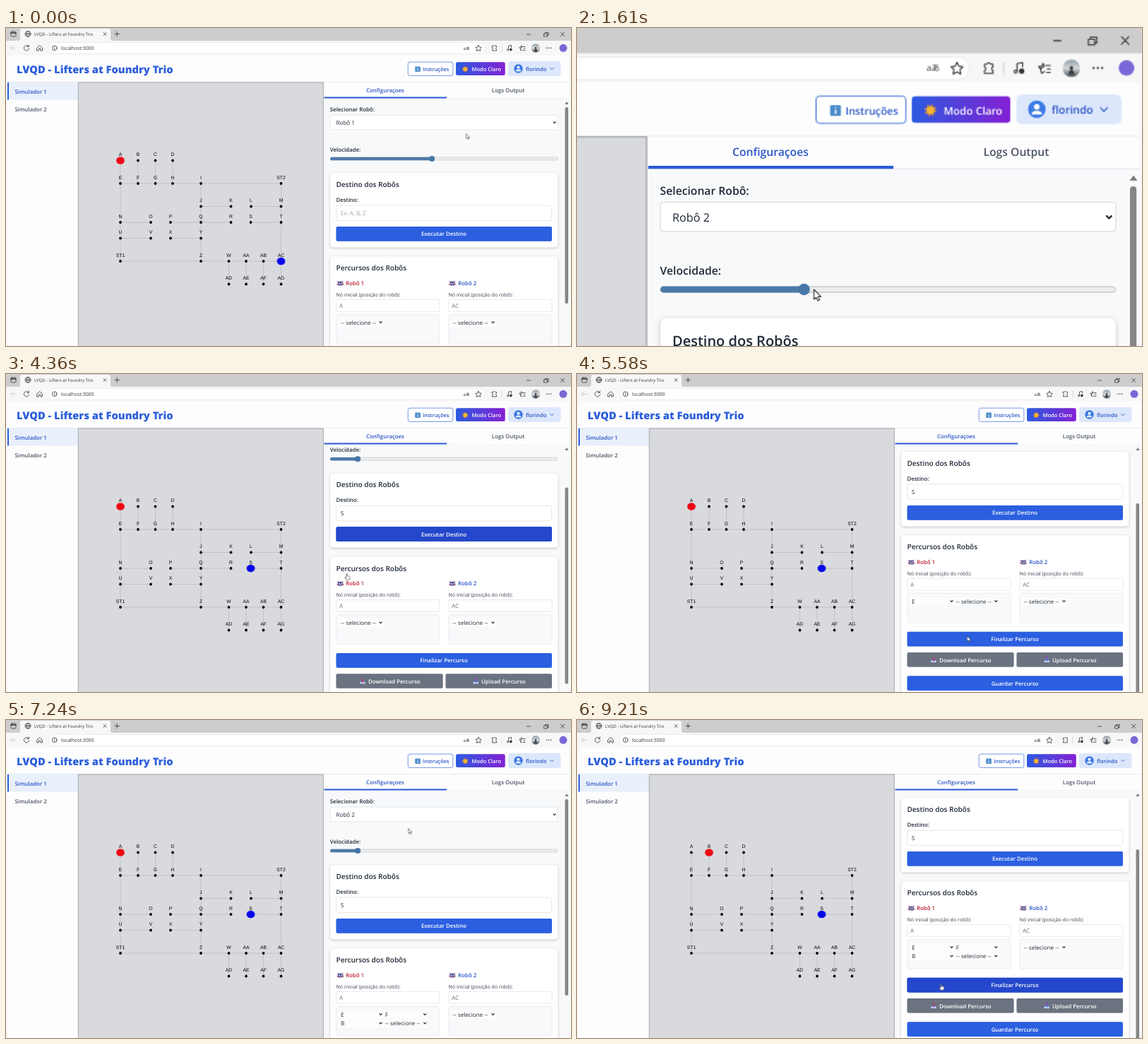
Animation, 800 px wide and 450 px high, one loop 9.24 s. Source, as an HTML page:

```html
<!DOCTYPE html>
<html lang="pt">
<head>
<meta charset="utf-8">
<title>Simulador</title>
<style>
html, body { margin: 0; width: 100%; height: 100%; overflow: hidden; background: #f7f7f7; }
svg { display: block; width: 100vw; height: 100vh; }
text { font: 600 7.85px "Open Sans", "Noto Sans", sans-serif; fill: #1f2937; text-rendering: geometricPrecision; }
.mid { text-anchor: middle; }
.reg { font-weight: 400; font-size: 8.1px; }
.small { font-weight: 400; font-size: 7.05px; fill: #374151; }
.h2 { font-size: 10px; }
.grey { fill: #6b7280; }
.hint { fill: #a3a8b0; }
.blue { fill: #2b55c5; }
.white { fill: #fff; }
.chrome { font-weight: 400; font-size: 6.9px; fill: #333; }
.node { font: 6.8px "Liberation Sans", Arial, sans-serif; fill: #000; text-anchor: middle; }
.icon { fill: none; stroke: #333; stroke-width: .8; stroke-linecap: round; stroke-linejoin: round; }
.card { fill: #fff; stroke: #eceef0; stroke-width: .5; filter: drop-shadow(0 1px 1.5px #0003); }
.field { fill: #fff; stroke: #dcdfe4; stroke-width: .7; }
.box { fill: #f8f9fa; stroke: #e6e8eb; stroke-width: .7; }
.btn { fill: #2b5fe0; filter: drop-shadow(0 .6px .6px #0003); }
.hover { fill: #2447cb; }
.dark { fill: #6b7280; }
.chev { fill: none; stroke: #222; stroke-width: 1.1; }
#cam { transform-origin: 800px 0; }
</style>
</head>
<body>
<svg viewBox="0 0 800 450">
<defs>
  <linearGradient id="mode"><stop stop-color="#2b5be0"/><stop offset="1" stop-color="#8420d4"/></linearGradient>
  <linearGradient id="photo" x2="0" y2="1"><stop stop-color="#8fa0ab"/><stop offset=".5" stop-color="#d5d8da"/><stop offset="1" stop-color="#4d5252"/></linearGradient>
  <clipPath id="view"><path d="M450 100.2H790V450H450z"/></clipPath>
  <path id="down" class="chev" d="M-2-1 0 1 2-1"/>
  <g id="bot">
    <path d="M-4-3 -2-1.5M4-3 2-1.5" stroke="#7a4bb5" stroke-width="1.2"/>
    <rect x="-3.3" y="-2.6" width="6.6" height="5.8" rx="1.6" fill="#54417f"/>
    <path d="M-4.2 0V2.5M4.2 0V2.5" stroke="#c0456a" stroke-width="1"/>
    <circle cx="-1.4" r="1" fill="#b9e2f5"/><circle cx="1.4" r="1" fill="#b9e2f5"/>
    <path d="M-1.5 2H1.5" stroke="#eee" stroke-width=".7"/>
  </g>
  <g id="tray">
    <path d="M-3.6-.5H3.6V3.5H-3.6z" fill="#5a7fd0"/>
    <path d="M-3.6 1H-1.5L-.8 2.2H.8L1.5 1H3.6V3.5H-3.6z" fill="#c9d4ee"/>
  </g>
</defs>

<g id="cam">
  <!-- browser chrome -->
  <path fill="#cdcdcd" d="M0 0H800V18H0z"/>
  <path fill="#f7f7f7" d="M0 18H17Q20 18 20 15V4Q20 1 23 1H145Q148 1 148 4V15Q148 18 151 18H800V450H0z"/>
  <g class="icon">
    <rect x="7" y="5" width="7" height="7" rx="1.5"/><path d="M7 7H14" stroke-width="1.6"/>
    <circle cx="31" cy="8.3" r="3.9"/><ellipse cx="31" cy="8.3" rx="1.7" ry="3.9"/><path d="M27.2 8.3H34.8"/>
    <path d="M138 6.5 142 10.5M142 6.5 138 10.5M154 8.5H160.500M157.200 5.200V11.800"/>
    <path d="M737.500 9H742.500M762 8H766.500V12H762zM763.500 8V6.500H768V10.500H766.500M785.500 6.200 790.700 11.500M790.700 6.200 785.500 11.500"/>
    <path d="M14 28.300H6.500M9.800 25 6.500 28.300 9.800 31.600" stroke="#c4c4c4"/>
    <path d="M32 26A3.700 3.700 0 1 0 32.800 29M32.400 24V26.400H30"/>
    <path d="M44 28 47.700 24.700 51.400 28V32H49V29.300H46.400V32H44z"/>
  </g>
  <rect x="60" y="20.500" width="618" height="16" rx="8" fill="#fff" stroke="#e2e2e2" stroke-width=".6"/>
  <g class="icon">
    <circle cx="68.700" cy="28.300" r="3.400"/><path d="M68.700 28V30M68.700 26.600V26.700"/>
    <path id="star" d="M669 24.300 670.300 27 673.300 27.400 671.100 29.500 671.700 32.500 669 31.100 666.300 32.500 666.900 29.500 664.700 27.400 667.700 27z"/>
    <path d="M688.500 25.500H690.200A1.400 1.400 0 0 1 692.800 25.500H694.500V27.500A1.300 1.300 0 0 0 694.500 30V32H688.500V30A1.300 1.300 0 0 0 688.500 27.500z"/>
    <path d="M702 24V33" stroke="#d5d5d5"/>
    <path d="M711.500 30.500V25.200L715.500 24.500V27.500"/><circle cx="710.500" cy="30.800" r="1"/><circle cx="714.800" cy="30.500" r="1.500" fill="#333"/>
    <path d="M732 26.500H735M733 29H735M732.500 31.500H735M730 25 730.900 27 728 29 729 32 731 30.800M730 25 729 27 726.800 27.300 728.400 29"/>
  </g>
  <text class="chrome" x="647.500" y="30.500" style="font-family:'Open Sans','Noto Sans CJK JP',sans-serif;font-size:6px">aあ</text>
  <circle cx="750" cy="28.500" r="6.200" fill="url(#photo)"/>
  <path d="M748 33Q748 29.500 750 29.500T752 33z" fill="#39404a"/><circle cx="750" cy="28.200" r="1.300" fill="#39404a"/>
  <g fill="#333"><circle cx="765.700" cy="28.300" r=".8"/><circle cx="768.700" cy="28.300" r=".8"/><circle cx="771.700" cy="28.300" r=".8"/></g>
  <circle cx="789" cy="28.300" r="5.500" fill="#7a68d8"/>
  <text class="chrome" x="40" y="10.700" style="font-size:6.100px">LVQD - Lifters at Foundry Trio</text>
  <text class="chrome" x="78" y="30.800">localhost:3000</text>

  <!-- page header -->
  <rect x="2" y="38.500" width="796" height="420" rx="3" fill="#fdfdfe"/>
  <path d="M2 76.500H798" stroke="#e5e7eb" stroke-width=".8"/>
  <text x="15" y="64.300" style="font-size:14.700px;font-weight:800;fill:#2d5fdb">LVQD - Lifters at Foundry Trio</text>
  <rect x="569.200" y="48.200" width="63.600" height="19.200" rx="2.500" fill="#fff" stroke="#3b6fd6" stroke-width=".7"/>
  <rect x="579.200" y="54.500" width="7.600" height="7.600" rx="1" fill="#4a8ccb"/>
  <path d="M583 57.700V60.700M583 55.800V56.600" stroke="#fff" stroke-width="1.100"/>
  <text class="blue" x="590" y="61" style="font-size:7.400px">Instruções</text>
  <rect x="637" y="48.300" width="69.700" height="18.800" rx="2.500" fill="url(#mode)"/>
  <circle cx="650.200" cy="58.200" r="3.600" fill="none" stroke="#e88b2d" stroke-width="1.200" stroke-dasharray="1.400 1.400"/>
  <circle cx="650.200" cy="58.200" r="2.900" fill="#f7b52f"/>
  <text class="white" x="659.500" y="61" style="font-size:7.500px">Modo Claro</text>
  <rect x="711" y="47" width="74.500" height="21" rx="4" fill="#dce7fb"/>
  <circle cx="725.500" cy="57.500" r="6.200" fill="#3c7be4"/>
  <circle cx="725.500" cy="55.700" r="2" fill="#fff"/><path d="M721.800 61.200Q722 58.600 725.500 58.600T729.200 61.200z" fill="#fff"/>
  <text class="blue" x="736" y="60.700" style="font-size:7.700px">florindo</text>
  <path class="icon" d="M770.500 56.300 773 58.900 775.500 56.300" style="stroke:#2b55c5"/>

  <!-- sidebar -->
  <path fill="#e9f0fc" d="M2 77H102V101.500H2z"/><path fill="#2b5fe0" d="M2 77H4V101.500H2z"/>
  <text class="blue" x="12.500" y="92.500">Simulador 1</text>
  <text x="12.500" y="117.500" style="fill:#4b5563">Simulador 2</text>

  <!-- map -->
  <path fill="#d9dade" stroke="#a2a5aa" stroke-width="1" d="M102.300 77H449.300V455H102.300z"/>
  <path id="edges" fill="none" stroke="#b3b2b0" stroke-width=".6"/>
  <g id="nodes"></g>
  <ellipse id="red" rx="5.900" ry="5.300" fill="#ee0612"/>
  <ellipse id="navy" rx="5.900" ry="5.300" fill="#0505ea"/>

  <!-- settings panel -->
  <path fill="#f8f9fa" d="M450 100H798V455H450z"/>
  <path fill="#e2e5e9" d="M450 99.400H798V100H450z"/>
  <path fill="#2b5bdb" d="M450.500 97.500H624V99.600H450.500z"/>
  <text class="mid blue" x="537" y="90.500">Configuraçoes</text>
  <text class="mid" x="711" y="90.500" style="fill:#4b5563">Logs Output</text>

  <g clip-path="url(#view)"><g id="page">
    <text x="458.800" y="118">Selecionar Robô:</text>
    <rect class="field" x="459" y="123.200" width="322.500" height="20.800" rx="2.500"/>
    <text class="reg" x="467.500" y="137" id="robot1">Robô 1</text>
    <text class="reg" x="467.500" y="137" id="robot2">Robô 2</text>
    <use href="#down" x="776.700" y="133.700"/>
    <text x="458.800" y="174.700">Velocidade:</text>
    <rect x="459.200" y="183" width="322" height="4" rx="2" fill="#ededed" stroke="#b4b4b4" stroke-width=".5"/>
    <rect id="level" x="459" y="182.800" height="4.400" rx="2.200" fill="#4d79a8"/>
    <circle id="thumb" cx="603" cy="185" r="4.100" fill="#4777a6"/>

    <rect class="card" x="459" y="205" width="322.500" height="105.500" rx="4"/>
    <text class="h2" x="467.500" y="225">Destino dos Robôs</text>
    <text x="467.500" y="245.800">Destino:</text>
    <rect class="field" x="467.700" y="251" width="305" height="21.500" rx="2.500"/>
    <rect id="focus" x="467.900" y="251.200" width="304.600" height="21" rx="2.500" fill="#fff" stroke="#111" stroke-width="1.300"/>
    <text class="reg hint" id="hint" x="473.800" y="264.800">Ex: A, B, Z</text>
    <text class="reg" id="typed" x="473.800" y="264.800">S</text>
    <rect class="btn" x="467.500" y="281" width="305.500" height="20.700" rx="2"/>
    <rect class="hover" id="runHover" x="467.500" y="281" width="305.500" height="20.700" rx="2"/>
    <text class="mid white" x="620" y="294.300">Executar Destino</text>

    <rect class="card" x="459" y="323" width="322.500" height="260" rx="4"/>
    <text class="h2" x="467.500" y="343.300">Percursos dos Robôs</text>
    <use href="#bot" x="473.300" y="361.300"/><use href="#bot" x="632" y="361.300"/>
    <text x="481" y="364.200" style="fill:#b91c2c">Robô 1</text>
    <text class="blue" x="640.200" y="364.200">Robô 2</text>
    <text class="small" x="467.500" y="379.800">Nó inicial (posição do robô):</text>
    <text class="small" x="626.500" y="379.800">Nó inicial (posição do robô):</text>
    <rect class="field" x="467.700" y="384.300" width="146.300" height="17" rx="2"/>
    <rect class="field" x="626.700" y="384.300" width="146.300" height="17" rx="2"/>
    <text class="reg grey" x="472" y="395.900">A</text><text class="reg grey" x="631" y="395.900">AC</text>
    <rect class="box" x="467.700" y="405.300" width="146.300" height="41.700" rx="2"/>
    <rect class="box" x="626.700" y="405.300" width="146.300" height="41.700" rx="2"/>
    <g id="picks"></g>

    <rect class="btn" x="467.500" y="459.700" width="305.500" height="20.700" rx="2"/>
    <rect class="hover" id="endHover" x="467.500" y="459.700" width="305.500" height="20.700" rx="2"/>
    <text class="mid white" x="620" y="473.200">Finalizar Percurso</text>
    <rect class="btn dark" x="467.500" y="489" width="151" height="20.600" rx="2"/>
    <rect class="btn dark" x="622.500" y="489" width="150.500" height="20.600" rx="2"/>
    <use href="#tray" x="505" y="499.400"/><use href="#tray" x="665.200" y="499.400"/>
    <path d="M505 495V500M503.300 498.400 505 500.200 506.700 498.400" fill="none" stroke="#c33b58" stroke-width="1.200"/>
    <path d="M665.200 500V495M663.500 496.700 665.200 495 666.900 496.700" fill="none" stroke="#8d4fc0" stroke-width="1.200"/>
    <text class="white" x="513" y="502.500">Download Percurso</text>
    <text class="white" x="673" y="502.500">Upload Percurso</text>
    <rect class="btn" x="467.500" y="522.200" width="305.500" height="20.700" rx="2"/>
    <text class="mid white" x="620" y="535.700">Guardar Percurso</text>
  </g></g>
  <path fill="#7d7d7d" d="M791.300 108 794 104.200 796.700 108z"/>
  <rect id="bar" x="791.500" y="112" width="4.600" height="278" rx="2.300" fill="#858585"/>

  <!-- pointer, drawn around its hot spot -->
  <g id="mouse" stroke="#222" stroke-width=".6" stroke-linejoin="round" fill="#fff">
    <path id="arrow" d="M0 0V7L1.600 5.600 2.800 8 4 7.400 2.900 5.100H5z"/>
    <path id="hand" d="M-.7.500Q0-.4.700.500V3.200L3.600 4Q4.600 4.300 4.400 5.500L3.700 8.800H-.6L-2.600 6Q-2.800 4.900-1.700 5.200L-.7 6z"/>
    <path id="beam" d="M-1.400-3.800H1.400M0-3.800V3.800M-1.400 3.800H1.400" stroke-width=".8"/>
  </g>
</g>
</svg>
<script>
const LOOP = 9240;
const $ = id => document.getElementById(id);
const rules = [];

// Turns [ms, value] stops into a looping keyframe rule for one element.
function track(id, prop, stops, ease = 'linear') {
  const all = [...stops, [LOOP, stops.at(-1)[1]]];
  const steps = all.map(([ms, v]) => `${(ms / LOOP * 100).toFixed(3)}%{${prop}:${v}}`).join('');
  rules.push(`@keyframes ${id}{${steps}}#${id}{animation:${id} ${LOOP}ms ${ease} infinite}`);
}
function show(id, ...spans) {
  const stops = spans[0][0] > 0 ? [[0, 'hidden']] : [];
  for (const [from, to = LOOP] of spans) {
    stops.push([from, 'visible']);
    if (to < LOOP) stops.push([to, 'hidden']);
  }
  track(id, 'visibility', stops, 'step-end');
}
const move = (id, stops, ease) =>
  track(id, 'transform', stops.map(([ms, x, y]) => [ms, `translate(${x}px,${y}px)`]), ease);

// Map: one row per height, "name x" pairs.
const rows = {
  187.5: 'A 162 B 187 C 211.5 D 236',
  220: 'E 162 F 187 G 211.5 H 236 I 276 ST2 389.5',
  252.5: 'J 276 K 318.5 L 347 M 389.5',
  275: 'N 162 O 205 P 233 Q 276 R 318.5 S 346.5 T 389.5',
  297.5: 'U 162 V 205 X 233 Y 276',
  330: 'ST1 162 Z 276 W 315.5 AA 340 AB 364.5 AC 389.5',
  362.5: 'AD 315.5 AE 340 AF 364.5 AG 389.5'
};
const at = {};
for (const [y, row] of Object.entries(rows))
  for (const [, name, x] of row.matchAll(/(\w+) ([\d.]+)/g)) at[name] = [+x, +y];
$('nodes').innerHTML = Object.entries(at).map(([name, [x, y]]) =>
  `<circle cx="${x}" cy="${y}" r="1.9"/><text class="node" x="${x}" y="${y - 6.4}">${name}</text>`).join('');
$('edges').setAttribute('d',
  'A-E-ST1-AC-ST2-E B-F C-G D-H I-Z J-K L-M N-O P-R S-T U-V X-Y W-AD AA-AE AB-AF AC-AG'
    .split(' ').map(p => 'M' + p.split('-').map(n => at[n]).join('L')).join(''));

// Route pickers: the list grows as nodes are chosen.
const pick = (x, y, label, chev) =>
  `<rect x="${x - 3}" y="${y - 8.2}" width="${chev + 7}" height="11" fill="#fdfdfd"/>` +
  `<text class="reg" x="${x}" y="${y}">${label}</text><use href="#down" x="${x + chev}" y="${y - 3.2}"/>`;
const ASK = '-- selecione --';
const routes = [[], ['E'], ['E', 'F'], ['E', 'F', 'B']];
$('picks').innerHTML = pick(632.5, 419.6, ASK, 57) + routes.map((route, i) =>
  `<g id="route${i}">` + [...route, ASK].map((label, k) =>
    pick(474 + k % 2 * 62.7, 419.6 + (k >> 1) * 12.5, label, 56.5)).join('') + '</g>').join('');
const chosen = [0, 5250, 6050, 6500, LOOP];
routes.forEach((_, i) => show('route' + i, [chosen[i], chosen[i + 1]]));

track('cam', 'transform', [[0, 'scale(1)'], [30, 'scale(1)'], [570, 'scale(2)'], [1930, 'scale(2)'], [2500, 'scale(1)']], 'ease-in-out');

show('robot1', [0, 1150]);
show('robot2', [1150]);
move('thumb', [[0, 0, 0], [1450, 0, 0], [1850, -105, 0]]);
track('level', 'width', [[0, '144px'], [1450, '144px'], [1850, '39px']]);

show('focus', [2520, 3120]);
show('hint', [0, 2850]);
show('typed', [2850]);
show('runHover', [3000, 4480]);
show('endHover', [7980]);

const ride = (id, path) => move(id, path.map(([ms, n]) => [ms, ...at[n]]));
ride('navy', [[0, 'AC'], [3200, 'AC'], [3700, 'T'], [4100, 'S']]);
ride('red', [[0, 'A'], [8200, 'A'], [8550, 'E'], [8820, 'F'], [9150, 'B']]);

const scroll = [[0, 0], [4200, 0], [4360, 64.5], [4480, 95], [6750, 95], [7050, 0], [7600, 0], [7880, 95]];
move('page', scroll.map(([ms, s]) => [ms, 0, -s]));
move('bar', scroll.map(([ms, s]) => [ms, 0, s * .75]));

move('mouse', [
  [0, 651.5, 149.5], [500, 564.5, 131.5], [850, 564.5, 131.5], [1050, 500, 157], [1180, 500, 157],
  [1400, 603, 185], [1450, 603, 185], [1850, 498, 185], [2000, 498, 185], [2450, 512, 258.7],
  [2850, 512, 258.7], [3070, 482.5, 282.5], [4480, 482.5, 282.5], [4850, 500, 322], [5000, 500, 322],
  [5250, 490, 345], [5500, 552.5, 371], [5620, 552.5, 371], [5850, 565, 322], [6050, 555, 345],
  [6250, 500, 334], [6500, 490, 355], [6700, 490, 355], [7100, 569.8, 153.5], [7500, 569.8, 153.5],
  [8000, 515.5, 373.5]
], 'ease-in-out');
show('arrow', [0, 2380], [4500, 7980]);
show('beam', [2380, 3000]);
show('hand', [3000, 4500], [7980]);

document.head.appendChild(document.createElement('style')).textContent = rules.join('\n');
</script>
</body>
</html>
```
